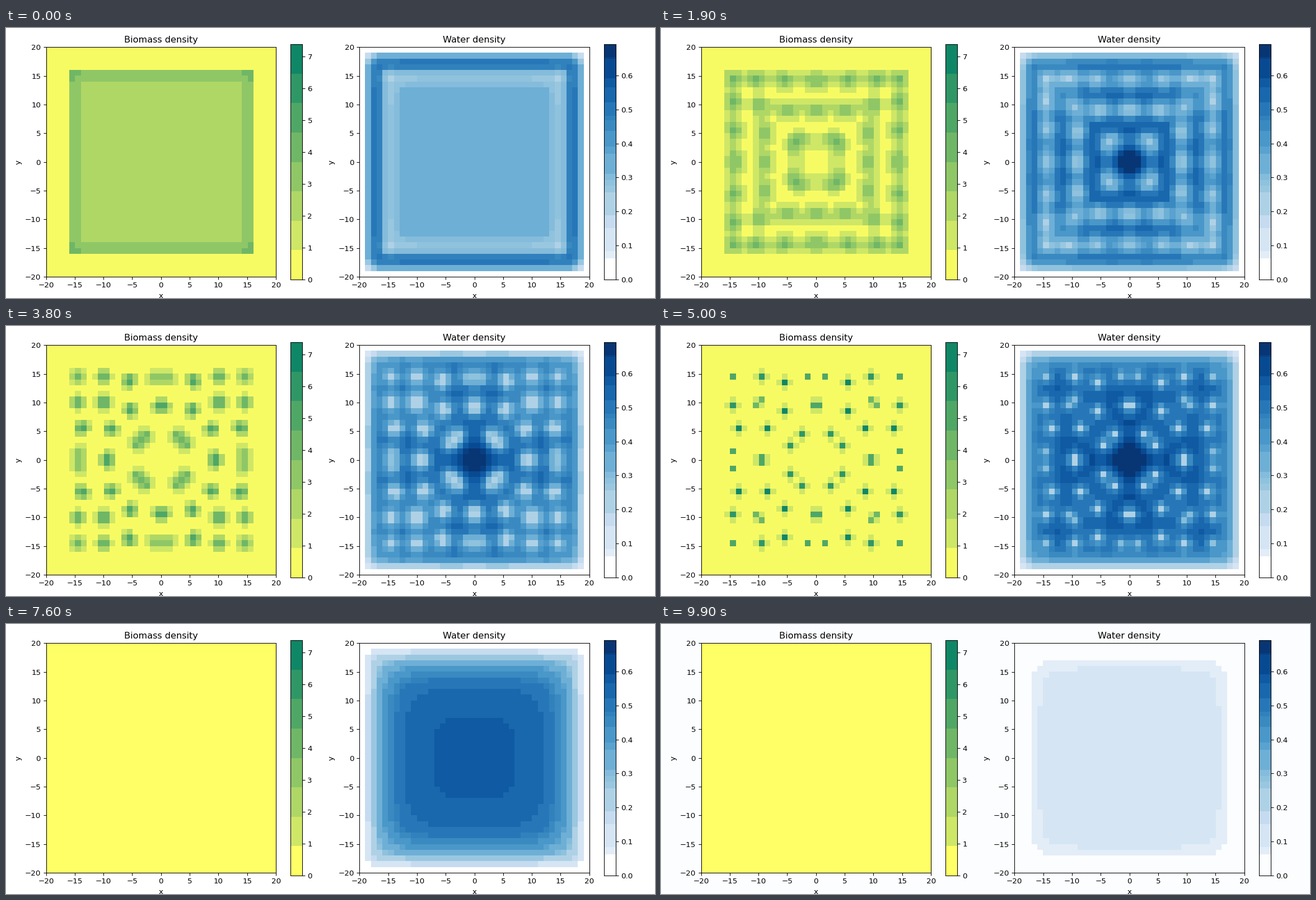
Write a matplotlib script that moves like this. It is 1159 by 483 pixels and loops after 10000 ms.

```python
import numpy as np
import matplotlib.pyplot as plt
from matplotlib.animation import FuncAnimation

W, H, DPI = 1159, 483, 96.6
FRAMES, STEP = 100, 100
HALF = 20                 # cells from the centre to the border
RIM = 16                  # plants start inside this square
DIFFUSION = 10.0          # water diffusion per cell
BIO_MAX, WATER_MAX = 7.38, 0.692
HOLDS = (1, 29, 73)       # ticks on which the picture rests

cell = np.arange(HALF)
radius = np.maximum.outer(cell, cell)
inside = radius < RIM


def mix(a, b, s):
    return a + (b - a) * np.clip(s, 0, 1)


# ---- biomass in one quadrant, symmetric about its diagonal ----
# clump (x, y, height), then the spot it shrinks to (x, y, height),
# then the height it keeps once the rain gets scarce
SPOTS = [
    (14, 14.2, 2.1, 14, 14, 2.4, 0),
    (10, 14, 4.5, 9, 14, 5.9, 0),
    (5.2, 13.6, 4.5, 5, 13, 7, 5.3),
    (0.5, 13.6, 2.8, 1, 14, 4.8, 0),
    (9.2, 9.8, 2.6, 9, 10, 4.1, 0),
    (4.6, 8.5, 4.6, 5, 8, 7, 5.3),
    (0, 8.5, 2.5, 0, 9, 4.4, 0),
    (2.4, 3.6, 2.8, 2, 4, 6, 4),
]


def bump(c, width):
    """Bell around c plus its mirror image across the centre line."""
    return np.exp(-(cell - c) ** 2 / width) + np.exp(-(cell + 1 + c) ** 2 / width)


def spots(t):
    s = (t - 2600) / 2400
    width = np.interp(t, [2600, 5000, 5900], [2.5, .6, .35])
    total = np.zeros((HALF, HALF))
    for x0, y0, h0, x1, y1, h1, h2 in SPOTS:
        height = np.interp(t, [2600, 5000, 5900, 6500, 7150],
                           [h0, h1, 1.1 * h2, h2, 0])
        g = np.outer(bump(mix(y0, y1, s), width), bump(mix(x0, x1, s), width))
        total += height * (g + g.T)
    return total


# an even carpet with a damped ripple at its edge and denser corners
depth = np.clip(14.5 - radius, 0, None)
corner = np.exp(-(cell - 15) ** 2 / 1.5)
carpet = inside * (2.3 + .9 * np.exp(-depth / 2) * np.cos(np.pi * depth / 4)
                   + np.outer(corner, corner))
rings = inside * (1.9 + 1.4 * np.cos(2 * np.pi * (radius - 14) / 5.4))


def biomass(t):
    if t < 1100:
        # rings form at the rim first and spread inwards
        lag = .6 * np.clip(1 - radius / 15, 0, 1)
        return mix(carpet, rings, 1.6 * t / 1100 - lag)
    return mix(rings, spots(t), (t - 1100) / 1500)


# ---- water: balance of rain, loss, uptake and diffusion ----
N = HALF - 1
second = np.diag(np.full(N, -2.0)) + np.eye(N, k=1) + np.eye(N, k=-1)
second[0, 0] = -1
LAPLACE = np.kron(second, np.eye(N)) + np.kron(np.eye(N), second)


def water(t, bio):
    rain = 2.1 - .2 * t / 1000
    loss = 1 + bio[:N, :N].ravel() ** 2
    u = np.linalg.solve(np.diag(loss) - DIFFUSION * LAPLACE,
                        np.full(N * N, rain))
    return np.pad(u.reshape(N, N), (0, 1))


def mirror(q):
    top = np.hstack([q[:, ::-1], q])
    return np.vstack([top[::-1], top])


# ---- colours: each map is reduced to flat bands, eight levels a channel ----
def bands(name, base):
    """Lookup table of 256 colours; the first `base` entries form one band."""
    rgb = plt.get_cmap(name)(np.arange(256))[:, :3]
    key = np.minimum(rgb * 8, 7).astype(int)
    key[:base] = -1
    group = np.cumsum(np.r_[0, np.any(np.diff(key, axis=0), axis=1)])
    return np.array([rgb[group == g].mean(0) for g in group])


def paint(values, top, table):
    return table[np.clip(values / top * 256, 0, 255).astype(int)]


BIO_BASE, WATER_BASE = 32, 23
bio_table = bands("summer_r", BIO_BASE)
water_table = bands("Blues", WATER_BASE)
DULL, BRIGHT = np.array([[247, 251, 99], [255, 255, 102]]) / 255
PAPER, TINTED = np.array([[255, 255, 255], [252, 253, 254]]) / 255


# ---- figure ----
fig = plt.figure(figsize=(W / DPI + 1e-9, H / DPI + 1e-9), dpi=DPI)


def axes_at(x, y, w, h):
    return fig.add_axes([x / W, 1 - (y + h) / H, w / W, h / H])


def panel(left, title, top, ticks):
    ax = axes_at(left, 34.3, 410.6, 410.6)
    field = ax.imshow(np.zeros((2 * HALF, 2 * HALF, 3)), origin="lower",
                      extent=(-HALF, HALF, -HALF, HALF), aspect="auto",
                      interpolation="nearest")
    ax.set(title=title, xlabel="x", ylabel="y",
           xticks=range(-20, 21, 5), yticks=range(-20, 21, 5))
    bar_ax = axes_at(left + 436.7, 29.3, 20.9, 420.3)
    bar = bar_ax.imshow(np.zeros((256, 1, 3)), origin="lower", aspect="auto",
                        extent=(0, 1, 0, top), interpolation="nearest")
    bar_ax.set_xticks([])
    bar_ax.yaxis.tick_right()
    bar_ax.set_yticks(ticks)
    return field, bar


bio_img, bio_bar = panel(71.5, "Biomass density", BIO_MAX, range(8))
water_img, water_bar = panel(631.2, "Water density", WATER_MAX,
                             np.arange(7) / 10)


def update(i):
    t = (i - (i in HOLDS)) * STEP
    bio = biomass(t)
    paper = mix(PAPER, TINTED, (t - 8000) / 1900)
    bio_table[:BIO_BASE] = mix(DULL, BRIGHT, (t - 5000) / 1500)
    water_table[:WATER_BASE] = paper
    fig.set_facecolor(paper)
    bio_img.set_data(paint(mirror(bio), BIO_MAX, bio_table))
    water_img.set_data(paint(mirror(water(t, bio)), WATER_MAX, water_table))
    bio_bar.set_data(bio_table[:, None])
    water_bar.set_data(water_table[:, None])
    return bio_img, bio_bar, water_img, water_bar


anim = FuncAnimation(fig, update, frames=FRAMES, interval=STEP, repeat=True,
                     repeat_delay=0, init_func=lambda: update(0))
plt.show()
```
